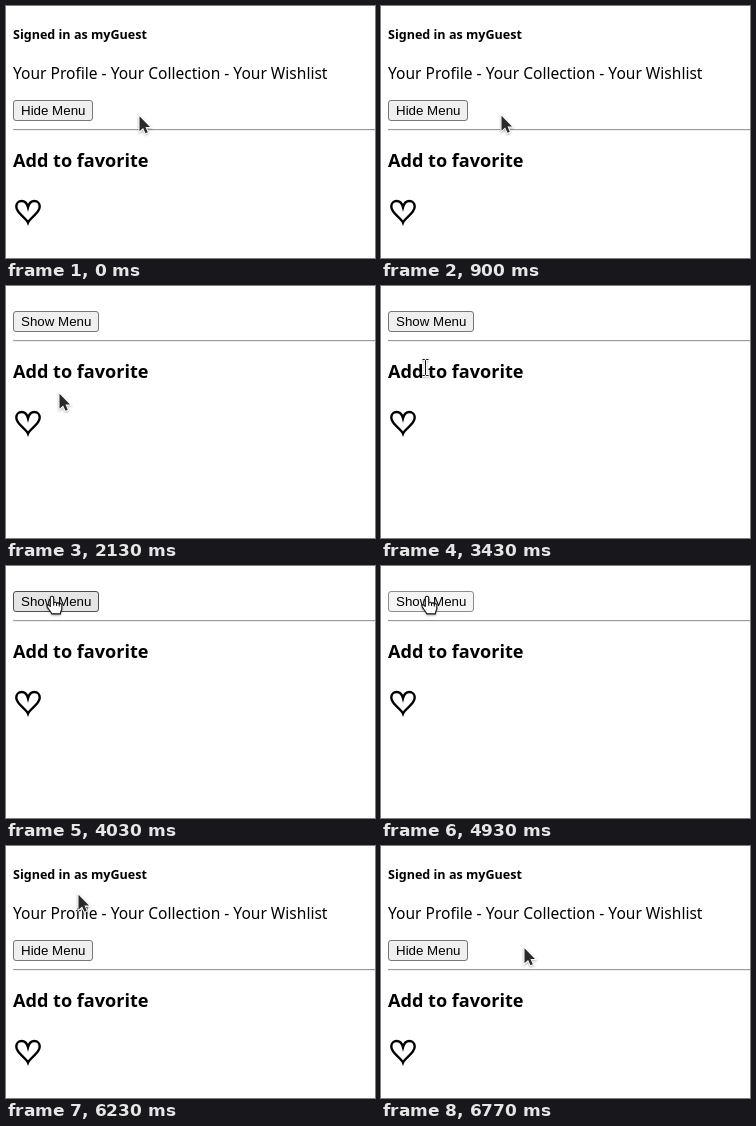
Animation of 369 by 252 pixels, one loop 7460 ms. Source, as an HTML page:

```html
<!DOCTYPE html>
<html lang="en">
<head>
<meta charset="utf-8">
<title>Menu toggle</title>
<style>
  html, body { margin: 0; width: 100%; height: 100%; overflow: hidden; background: #fff; }
  svg { display: block; width: 369px; height: 252px; }
  text { font-family: "Noto Sans", "Open Sans", sans-serif; fill: #000; white-space: pre; }
  .user { font-size: 12.55px; font-weight: 700; }
  .links { font-size: 15.55px; }
  .title { font-size: 18.1px; font-weight: 700; }
  #label { font: 13.333px "Liberation Sans", Arial, sans-serif; }
  #cursor { filter: drop-shadow(0 1px 1px rgba(0, 0, 0, .3)); }
  #cursor > g { visibility: hidden; }
</style>
</head>
<body>
<svg viewBox="0 0 369 252">
  <g id="menu">
    <text class="user" x="7" y="33">Signed in as myGuest</text>
    <text class="links" x="7" y="73">Your Profile - Your Collection - Your Wishlist</text>
  </g>
  <g id="content">
    <rect id="button" x="7.5" y="94.5" width="79" height="20" rx="2.5"/>
    <text id="label" x="15" y="109">Hide Menu</text>
    <path d="M7 123h362v1H7z" fill="#9a9a9a"/>
    <path d="M7 124h362v1H7z" fill="#eee"/>
    <text class="title" x="7" y="161">Add to favorite</text>
    <path fill="none" stroke="#000" stroke-width="2.4" d="M22 216.6C20 211.5 10.3 207.5 10.3 200.6C10.3 197.2 12.6 195 15.6 195C18.8 195 21 197.4 22 201.2C23 197.4 25.2 195 28.4 195C31.4 195 33.7 197.2 33.7 200.6C33.7 207.5 24 211.5 22 216.6z"/>
  </g>
  <g id="cursor">
    <g id="arrow">
      <path transform="translate(.5 .8)" d="M0 0V15L3.6 11.6L6 17L8.3 16L6 10.8H10.5z" fill="#2a2a2a" stroke="#fff" stroke-width="2" paint-order="stroke"/>
    </g>
    <g id="hand" transform="translate(1 -.6)" stroke="#111" stroke-width="1.1" stroke-linejoin="round">
      <path fill="#fff" d="M-1.7 10V1.5a1.7 1.7 0 0 1 3.4 0V7a1.4 1.4 0 0 1 2.8 .6a1.4 1.4 0 0 1 2.8 .6a1.3 1.3 0 0 1 2.5 .8V12c0 2-1.4 3-1.4 5.5H-.2C-1 15-4 12.5-4.8 10.3c-.8-1.6 1.2-2.3 2-1.2z"/>
      <path fill="none" d="M1.7 7v2.4M4.5 7.6v2M7.3 8.2v1.8"/>
    </g>
    <g id="beam" transform="translate(.5 .5)" fill="none">
      <path d="M-3-8h2.2L0-7L.8-8H3M0-7V7M-3 8h2.2L0 7L.8 8H3" stroke="#fff" stroke-width="2.6"/>
      <path d="M-3-8h2.2L0-7L.8-8H3M0-7V7M-3 8h2.2L0 7L.8 8H3" stroke="#111"/>
    </g>
  </g>
</svg>
<script>
const LOOP = 7460, SHIFT = 69;
const el = id => document.getElementById(id);

// Pointer path: time, x, y; each position holds until the next.
const path = [
  [0, 133, 109.5], [800, 131, 109.5], [870, 120, 109], [960, 103, 108],
  [1050, 86, 107], [1130, 70, 106], [1220, 58, 106], [1300, 53, 107],
  [3230, 52, 105], [3300, 49, 98], [3360, 46, 90], [3430, 44, 81],
  [3500, 45, 70], [3600, 46, 58], [3700, 49, 45], [3830, 52, 38],
  [3930, 54, 34], [4030, 45, 31],
  [6070, 47, 33], [6150, 56, 38], [6230, 72, 48], [6310, 92, 62],
  [6390, 112, 78], [6470, 128, 91], [6550, 137, 99], [6630, 141, 101.5],
  [6770, 143, 101.5]
];

const looks = {
  idle: ["#efefef", "#767676"],
  hover: ["#e5e5e5", "#4f4f4f"],
  pressed: ["#f5f5f5", "#8d8d8d"]
};

const within = (t, a, b) => t >= a && t < b;

function cursorKind(x, y, open) {
  const pageY = open ? y : y + SHIFT;
  if (x < (open ? 87 : 93) && within(pageY, 94, 115)) return "hand";
  const onTitle = x < 142 && within(pageY, 144, 166);
  const onMenu = open && (x < 140 && within(y, 21, 37) || x < 323 && within(y, 58, 77));
  return onTitle || onMenu ? "beam" : "arrow";
}

function draw(t) {
  const open = !within(t, 2100, 5030);
  const [, x, y] = path.findLast(p => p[0] <= t);
  // The pointer shape catches up shortly after the menu folds.
  const kind = cursorKind(x, y, !within(t, 2130, 5030));
  const pressed = within(t, 2070, 2100) || within(t, 4930, 5030);
  const over = cursorKind(x, y, open) === "hand";
  const [fill, stroke] = looks[pressed ? "pressed" : over ? "hover" : "idle"];

  el("menu").style.visibility = open ? "visible" : "hidden";
  el("content").setAttribute("transform", `translate(0 ${open ? 0 : -SHIFT})`);
  el("label").textContent = open ? "Hide Menu" : "Show Menu";
  el("button").setAttribute("width", open ? 79 : 85);
  el("button").setAttribute("fill", fill);
  el("button").setAttribute("stroke", stroke);
  el("cursor").setAttribute("transform", `translate(${x} ${y})`);
  for (const id of ["arrow", "hand", "beam"])
    el(id).style.visibility = id === kind ? "visible" : "hidden";
}

const start = performance.now();
function tick() {
  draw((performance.now() - start) % LOOP);
  requestAnimationFrame(tick);
}
tick();
</script>
</body>
</html>
```
